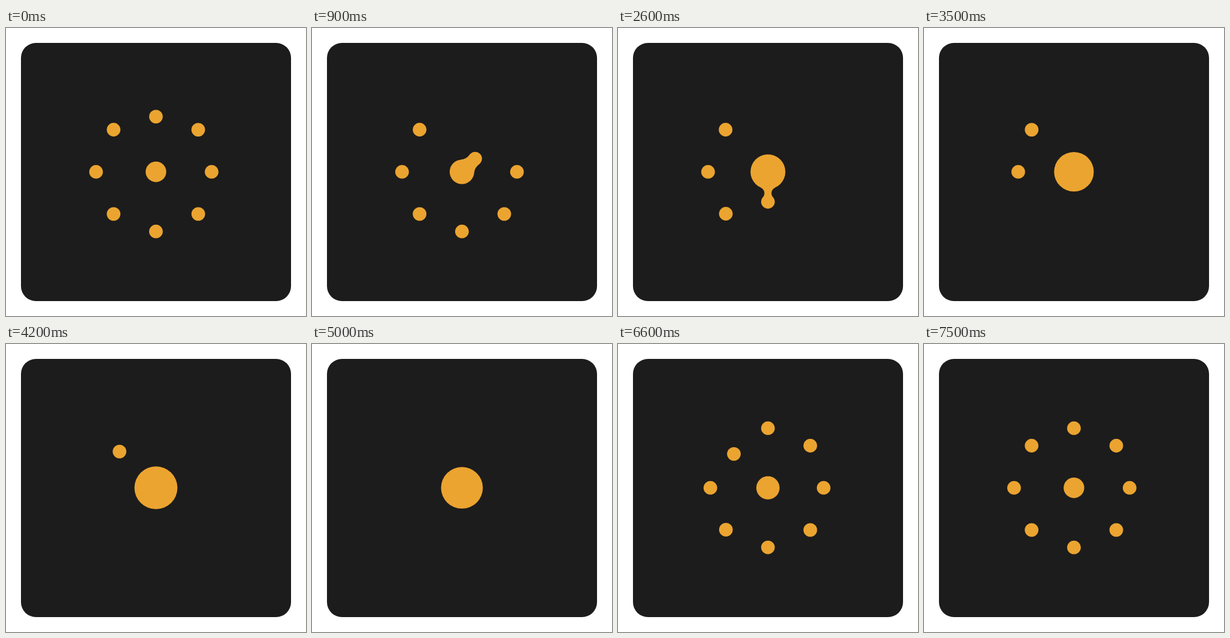
Write an HTML page that moves like this. It is 501x483 px and loops after 7600 ms.

```html
<!DOCTYPE html>
<html lang="en">
<head>
<meta charset="utf-8">
<title>Gooey dots</title>
<style>
  html, body { margin: 0; width: 100%; height: 100%; overflow: hidden; background: #fff; }
  svg { display: block; width: 100vw; height: 100vh; }
</style>
</head>
<body>
<svg viewBox="0 0 501 483">
  <rect x="25" y="25" width="451" height="433" rx="25" fill="#1c1c1c"/>
  <g id="goo" fill="#eba430" transform="translate(250.4 241.2)"></g>
</svg>
<script>
const LOOP = 7600, STEP = 100;
const DOT_RADIUS = 11.4;
const IN_TIME = 1000, OUT_TIME = 850;
const IN_STARTS = [-624, -46, 540, 1096, 1701, 2343, 2884, 3484];
const GROWTH = [[0, 17.2], [900, 20.5], [1800, 25.7], [3200, 31.7], [4000, 35.5], [4500, 36.5]];
const SHRINK_START = 4500, SHRINK_END = 7200;

const clamp = (v, lo = 0, hi = 1) => Math.min(hi, Math.max(lo, v));
const expoIn = x => x <= 0 ? 0 : x >= 1 ? 1 : 2 ** (10 * (x - 1));
const expoOut = x => 1 - expoIn(1 - x);
const sineInOut = x => (1 - Math.cos(Math.PI * clamp(x))) / 2;

const goo = document.getElementById('goo');
function add(tag, attrs) {
  const el = document.createElementNS('http://www.w3.org/2000/svg', tag);
  for (const key in attrs) el.setAttribute(key, attrs[key]);
  return goo.appendChild(el);
}

const core = add('circle', {});
// Each dot lives on its own x axis, clockwise from the top.
const dots = IN_STARTS.map((inStart, i) => {
  const transform = `rotate(${i * 45 - 90})`;
  return {
    inStart,
    outStart: 5000 + i * 200,
    reach: i === 2 ? 93 : 100,
    circle: add('circle', { r: DOT_RADIUS, transform }),
    neck: add('path', { transform })
  };
});

function coreRadius(t) {
  if (t >= SHRINK_START) {
    const p = sineInOut((t - SHRINK_START) / (SHRINK_END - SHRINK_START));
    return 36.5 - 19.3 * p;
  }
  const k = GROWTH.findIndex(([time]) => time > t);
  const [t0, r0] = GROWTH[k - 1], [t1, r1] = GROWTH[k];
  return r0 + (r1 - r0) * (t - t0) / (t1 - t0);
}

function distance(dot, t) {
  return dot.reach * (t < dot.outStart
    ? 1 - expoIn((t - dot.inStart) / IN_TIME)
    : expoOut((t - dot.outStart) / OUT_TIME));
}

// Concave bridge whose two arcs touch both circles.
function neckPath(R, d) {
  const r = DOT_RADIUS, gap = d - R - r;
  const f = clamp(20 - gap, 0, 20);
  if (d <= R - r || f < 1) return '';
  const a = R + f, b = r + f;
  const x = (a * a + d * d - b * b) / (2 * d);
  const h = Math.sqrt(Math.max(0, a * a - x * x));
  if (gap > 0 && h <= f) return '';
  const ax = x * R / a, ay = h * R / a;
  const bx = d + (x - d) * r / b, by = h * r / b;
  return `M${ax} ${-ay}A${f} ${f} 0 0 0 ${bx} ${-by}L${bx} ${by}A${f} ${f} 0 0 0 ${ax} ${ay}Z`;
}

function draw(t) {
  const R = coreRadius(t);
  core.setAttribute('r', R);
  for (const dot of dots) {
    const d = distance(dot, t);
    dot.circle.setAttribute('cx', d);
    dot.neck.setAttribute('d', neckPath(R, d));
  }
}

function tick() {
  const t = performance.now() % LOOP;
  draw(Math.floor(t / STEP) * STEP);
  requestAnimationFrame(tick);
}
tick();
</script>
</body>
</html>
```
